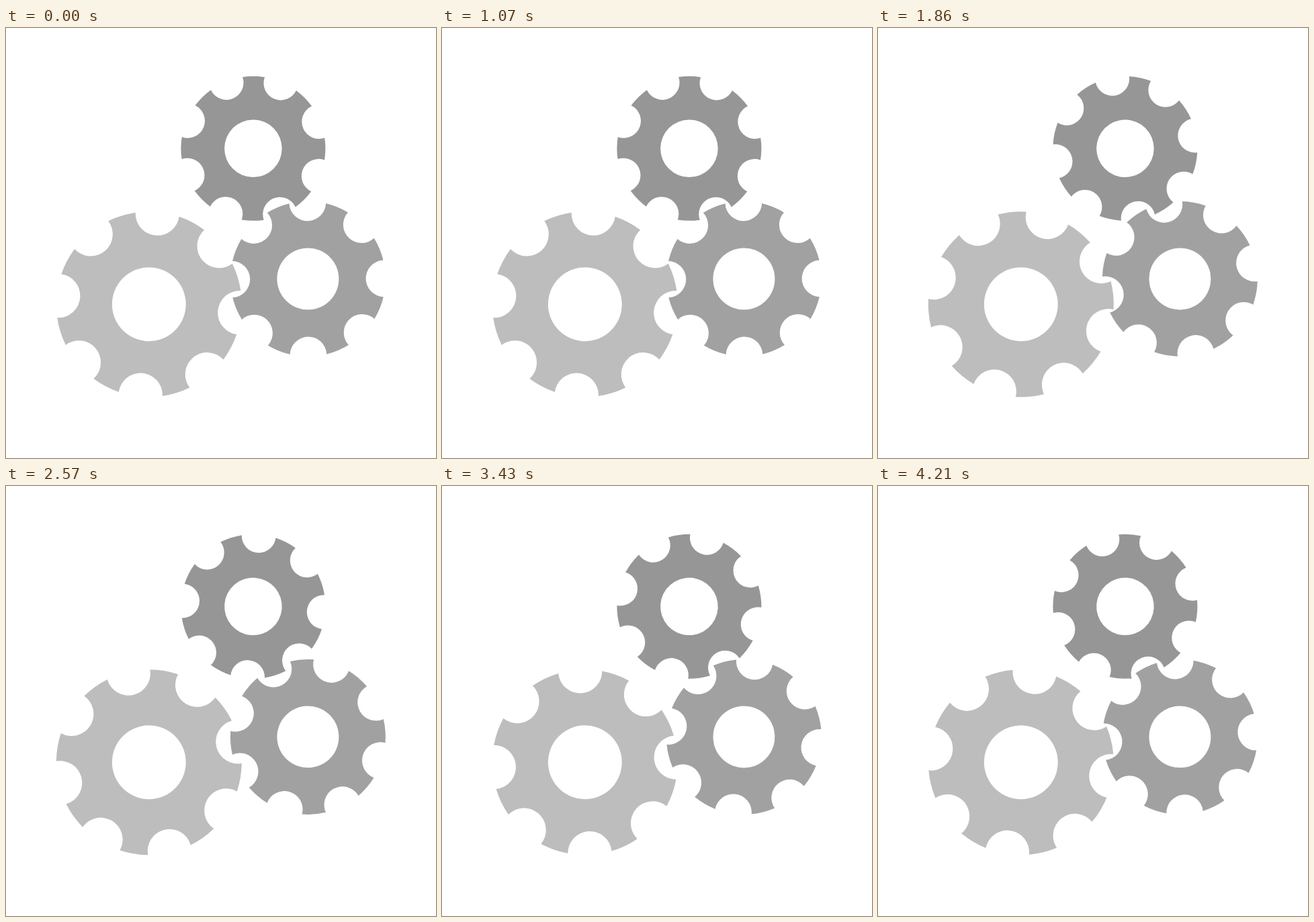
Animation, 640 px wide and 640 px high, one loop 4280 ms. Source, as an HTML page with a canvas:

```html
<!DOCTYPE html>
<html lang="en">
<head>
<meta charset="utf-8">
<title>Gears</title>
<style>
  html, body { margin: 0; width: 100%; height: 100%; overflow: hidden; background: #fff; }
  canvas { display: block; }
</style>
</head>
<body>
<canvas id="stage" width="640" height="640"></canvas>
<script>
const ctx = document.getElementById('stage').getContext('2d');
const LOOP = 4280, FPS = 14, TEETH = 8;
const STEP = 45 / 27;          // degrees per step: one tooth in 27 steps
const STEPS_PER_FRAME = 1.8;
const rad = deg => deg * Math.PI / 180;

// angle: clockwise degrees from the top to a tooth's middle; dir: 1 is clockwise
const gears = [
  { x: 212.8, y: 411.2, r: 138, color: '#bdbdbd', angle: -17.2, dir: -1 },
  { x: 367.9, y: 179.3, r: 107.5, color: '#969696', angle: 0.35, dir: -1 },
  { x: 449.4, y: 373.4, r: 115.5, color: '#a1a1a1', angle: 22.2, dir: 1 }
];

function drawGear({ x, y, r, color, angle, dir }, turn) {
  const pitch = rad(360 / TEETH), halfTooth = rad(8.82), notchEnd = rad(92.75);
  ctx.save();
  ctx.translate(x, y);
  ctx.rotate(rad(angle + dir * turn - 90));
  ctx.scale(r, r);
  ctx.beginPath();
  for (let i = 0; i < TEETH; i++) {
    const a = i * pitch, n = a + pitch / 2;
    ctx.arc(0, 0, 1, a - halfTooth, a + halfTooth);
    ctx.arc(0.983 * Math.cos(n), 0.983 * Math.sin(n), 0.237, n - notchEnd, n + notchEnd, true);
  }
  ctx.closePath();
  ctx.moveTo(0.398, 0);
  ctx.arc(0, 0, 0.398, 0, 2 * Math.PI);
  ctx.fillStyle = color;
  ctx.fill('evenodd');
  ctx.restore();
}

function draw() {
  // Frames start on whole hundredths of a second
  const t = Math.floor(performance.now() % LOOP / 10) * 10;
  const frame = Math.floor((t + 5) * FPS / 1000);
  const turn = Math.round(frame * STEPS_PER_FRAME) * STEP;
  ctx.fillStyle = '#fff';
  ctx.fillRect(0, 0, 640, 640);
  gears.forEach(g => drawGear(g, turn));
  requestAnimationFrame(draw);
}
draw();
</script>
</body>
</html>
```
